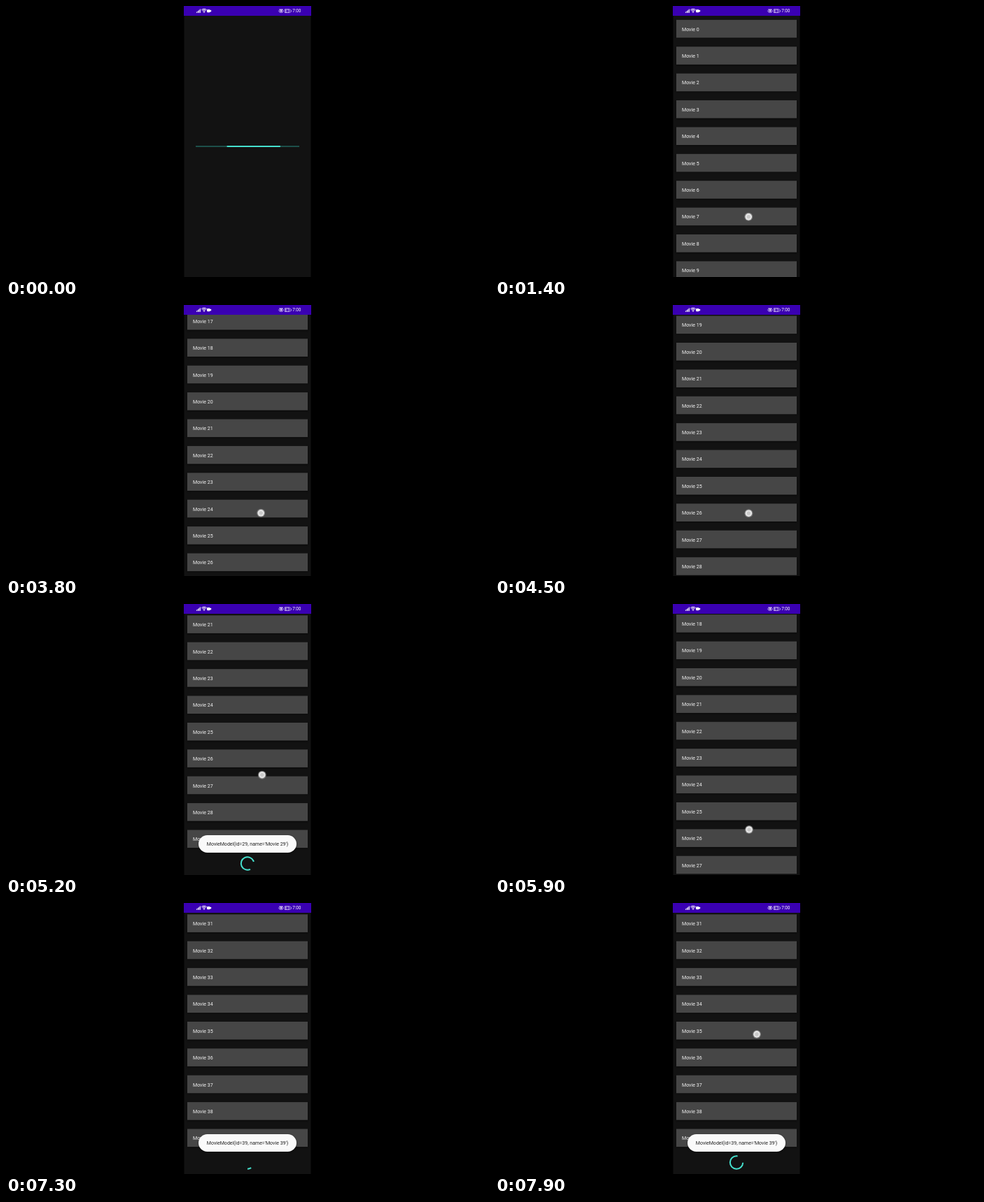
Recreate the animation shown at these times as an HTML page with a canvas. Size 690 by 388 pixels, loop 8 s.

```html
<!DOCTYPE html>
<html lang="en">
<head>
<meta charset="utf-8">
<title>Endless movie list</title>
<style>
html, body { margin: 0; width: 100%; height: 100%; overflow: hidden; background: #000; }
canvas { display: block; width: 690px; height: 388px; }
</style>
</head>
<body>
<canvas id="stage" width="690" height="388"></canvas>
<script>
const ctx = document.getElementById('stage').getContext('2d');
const LOOP = 8000, ROW = 38.4, TOP = 16.3, LIST_AT = 1000;
const FONT = 'Roboto, "Noto Sans", sans-serif';
const TEAL = '#45e0cd';

// time, index of the row at the top, easing towards it
const scroll = [
  [1000, -0.1], [1400, -0.1], [1700, 1, 'out'], [1980, 1], [2650, 11, 'out'],
  [3350, 11], [3720, 17.16, 'out'], [3800, 17.16], [4000, 18.4], [4200, 18.7, 'out'],
  [4480, 18.7], [4800, 21, 'out'], [5500, 21], [5900, 18.03], [6120, 18.03],
  [6620, 27.54, 'out'], [6700, 27.54], [6850, 29.6], [7150, 31, 'out'], [8000, 31]
];
// time from which the list ends with this row
const pages = [[1000, 9], [1920, 19], [3300, 29], [5450, 39]];
// start, end, row named in the message
const toasts = [[1560, 2150, 9], [2480, 3450, 18], [4720, 5550, 29], [7080, 8200, 39]];
// start, end, from x y, to x y
const touches = [
  [1380, 1560, 362, 310, 364, 240], [1960, 2160, 362, 325, 366, 190],
  [3330, 3520, 362, 325, 366, 190], [3750, 4000, 364, 308, 365, 258],
  [4480, 4640, 362, 310, 365, 220], [5050, 5300, 364, 290, 367, 215],
  [5500, 5900, 363, 210, 363, 323], [5900, 5960, 363, 323, 363, 323],
  [6100, 6280, 362, 330, 366, 170], [6640, 6700, 358, 340, 358, 340],
  [6700, 6850, 358, 340, 364, 261], [7700, 7900, 368, 310, 374, 188],
  [7900, 8000, 374, 188, 374, 180]
];

const clamp = v => Math.max(0, Math.min(1, v));
const mix = (a, b, u) => a + (b - a) * u;

function bezier(x1, x2, x) {
  let lo = 0, hi = 1, s = 0.5;
  for (let i = 0; i < 18; i++) {
    s = (lo + hi) / 2;
    const bx = 3 * (1 - s) * (1 - s) * s * x1 + 3 * (1 - s) * s * s * x2 + s * s * s;
    if (bx < x) lo = s; else hi = s;
  }
  return s * s * (3 - 2 * s);
}

function topRow(t) {
  for (let i = 1; i < scroll.length; i++) {
    const [t0, p0] = scroll[i - 1], [t1, p1, ease] = scroll[i];
    if (t <= t1) {
      const u = clamp((t - t0) / (t1 - t0));
      return mix(p0, p1, ease ? 1 - (1 - u) ** 2.2 : u);
    }
  }
  return scroll[scroll.length - 1][1];
}

function rect(x, y, w, h, color) {
  ctx.fillStyle = color;
  ctx.fillRect(x, y, w, h);
}

function pill(x, y, w, h, r, color) {
  ctx.fillStyle = color;
  ctx.beginPath();
  ctx.roundRect(x, y, w, h, r);
  ctx.fill();
}

function disc(x, y, r, color) {
  ctx.fillStyle = color;
  ctx.beginPath();
  ctx.arc(x, y, r, 0, Math.PI * 2);
  ctx.fill();
}

function arc(x, y, r, from, to, width, color) {
  ctx.strokeStyle = color;
  ctx.lineWidth = width;
  ctx.beginPath();
  ctx.arc(x, y, r, from, to);
  ctx.stroke();
}

function label(str, x, y, size, color, align = 'left') {
  ctx.font = `${size}px ${FONT}`;
  ctx.textAlign = align;
  ctx.fillStyle = color;
  ctx.fillText(str, x, y);
}

function shadow(color, blur, dy) {
  ctx.shadowColor = color;
  ctx.shadowBlur = blur;
  ctx.shadowOffsetY = dy;
}

function statusBar() {
  rect(254, 0, 182, 14, '#3a00b2');
  for (let i = 0; i < 4; i++) rect(272 + i * 1.6, 8.4 - i * 1.3, 1.1, 1.4 + i * 1.3, '#fff');
  for (const r of [1.7, 3.5, 5.2]) arc(283, 9.4, r, -Math.PI * 0.75, -Math.PI * 0.25, 1, '#fff');
  disc(283, 9, 0.8, '#fff');
  pill(287, 5, 4.6, 4.2, 1.3, '#fff');
  pill(291, 5.8, 2.2, 2.6, 0.8, '#fff');
  ctx.strokeStyle = '#e9e2ff';
  ctx.lineWidth = 0.9;
  ctx.beginPath();
  ctx.ellipse(393, 7.2, 3, 2, 0, 0, Math.PI * 2);
  ctx.stroke();
  disc(393, 7.2, 1.1, '#fff');
  for (let i = -1; i < 2; i++) rect(392.6 + i * 2, 4, 0.8, 1, '#e9e2ff');
  ctx.lineWidth = 0.7;
  ctx.strokeRect(398.4, 4.8, 6.6, 4.8);
  label('61', 401.7, 9, 4.6, '#fff', 'center');
  arc(405.3, 7.2, 2.2, -1.1, 1.1, 0.8, '#e9e2ff');
  label('7:00', 409.2, 9.4, 6.3, '#fff');
}

function progressBar(t) {
  const x = 271, w = 148, p = (t + 1376) % 1800;
  const part = (delay, span, x1, x2) => bezier(x1, x2, clamp((p - delay) / span));
  const bar = (head, tail) => {
    if (head > tail) rect(x + tail * w, 200, (head - tail) * w, 2, TEAL);
  };
  rect(x, 200, w, 2, '#1d4f4a');
  bar(part(0, 750, 0.2, 0.8), part(333, 850, 0.4, 1));
  bar(part(1000, 567, 0, 0.65), part(1267, 533, 0.1, 0.45));
}

function spinner(t, y) {
  const dt = t - 2800, deg = Math.PI / 180;
  const sweep = 150 - 130 * Math.cos(2 * Math.PI * (0.7 + dt / 1333));
  const start = -80 + 0.51 * dt;
  arc(345, y, 9.2, start * deg, (start + sweep) * deg, 2, TEAL);
}

function list(t) {
  const pos = topRow(t);
  const last = pages.filter(p => p[0] <= t).pop()[1];
  for (let n = Math.max(0, Math.floor(pos) - 1); n <= Math.min(last, Math.ceil(pos) + 10); n++) {
    const y = TOP + (n - pos) * ROW;
    shadow('rgba(0,0,0,.55)', 2, 1);
    rect(259, y, 172, 25.6, '#464646');
    shadow('transparent', 0, 0);
    label('Movie ' + n, 267, y + 15.8, 7.04, '#f4f4f4');
  }
  const end = 371.5 + (last - 8 - pos) * ROW;
  if (end < 400) spinner(t, end);
}

function toast(t) {
  for (const [from, to, n] of toasts) {
    if (t < from || t > to) continue;
    ctx.globalAlpha = Math.min(clamp((t - from) / 120), clamp((to - t) / 120));
    shadow('rgba(0,0,0,.4)', 3, 1);
    pill(275, 331, 140, 25, 12.5, '#fafafa');
    shadow('transparent', 0, 0);
    label(`MovieModel(id=${n}, name='Movie ${n}')`, 345, 346, 7.04, '#202020', 'center');
    ctx.globalAlpha = 1;
  }
}

function finger(t) {
  const hit = touches.find(([a, b]) => t >= a && t < b);
  if (!hit) return;
  const [a, b, x0, y0, x1, y1] = hit, u = (t - a) / (b - a);
  const x = mix(x0, x1, u), y = mix(y0, y1, u);
  disc(x, y, 6, 'rgba(150,150,150,.65)');
  disc(x, y, 4.8, '#e6e6e6');
  disc(x, y, 2.6, '#c9c9c9');
}

function draw(t) {
  rect(0, 0, 690, 388, '#000');
  rect(254.5, 0, 181, 388, '#121212');
  ctx.save();
  ctx.beginPath();
  ctx.rect(254, 14, 182, 374);
  ctx.clip();
  if (t < LIST_AT) {
    progressBar(t);
  } else {
    list(t);
    toast(t);
    finger(t);
  }
  ctx.restore();
  statusBar();
}

const began = performance.now();
function frame() {
  draw((performance.now() - began) % LOOP);
  requestAnimationFrame(frame);
}
frame();
</script>
</body>
</html>
```
